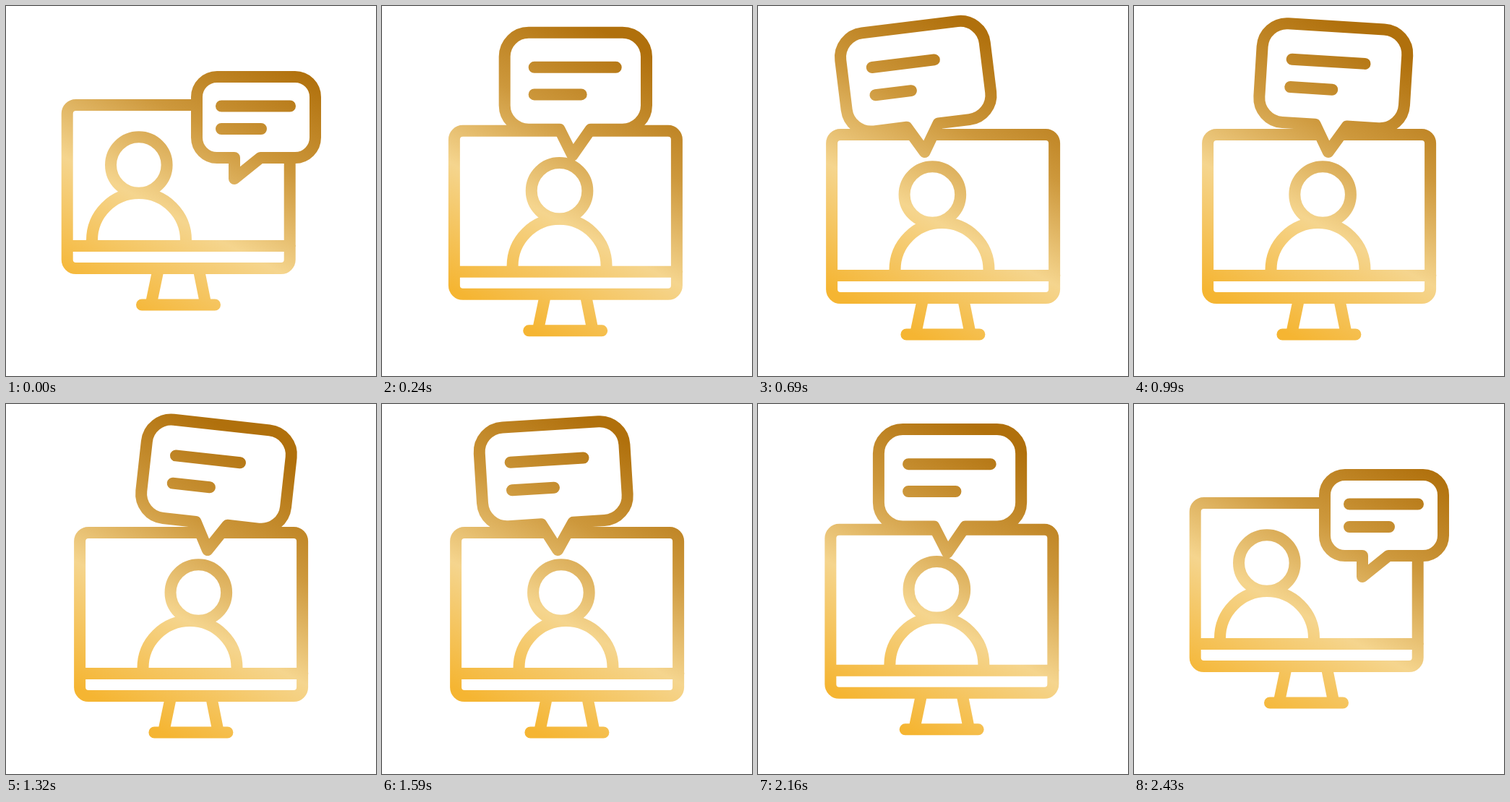
Recreate the animation shown at these times as an HTML page with a canvas. Size 512 by 512 pixels, loop 2.7 s.

```html
<!DOCTYPE html>
<html lang="en">
<head>
<meta charset="utf-8">
<title>Video call with speech bubble</title>
<style>
  html, body { margin: 0; width: 100%; height: 100%; overflow: hidden; background: #fff; }
  canvas { display: block; width: 100vmin; height: 100vmin; }
</style>
</head>
<body>
<canvas id="stage" width="512" height="512"></canvas>
<script>
const ctx = document.getElementById('stage').getContext('2d');
const LOOP = 2700;

const gold = ctx.createLinearGradient(164, 428, 359, 62);
gold.addColorStop(0, '#f5b532');
gold.addColorStop(0.37, '#f5d58e');
gold.addColorStop(0.68, '#cd983c');
gold.addColorStop(1, '#b0700c');

ctx.lineWidth = 16;
ctx.lineCap = ctx.lineJoin = 'round';

const mix = (a, b, p) => a + (b - a) * p;
const ease = x => x * x * (3 - 2 * x);

// Eased value from [time, value] keys.
function track(keys, t) {
  const i = keys.findIndex(k => k[0] > t);
  if (i < 0) return keys[keys.length - 1][1];
  const [t0, v0] = keys[i - 1], [t1, v1] = keys[i];
  return mix(v0, v1, ease((t - t0) / (t1 - t0)));
}

const openKeys = [[0, 0], [310, 1], [2100, 1], [2410, 0]];
const swayKeys = [[0, 0], [310, 0], [600, -1], [1200, 1], [1800, -1], [2100, 0]];

// Paths are placed by matrix so the gradient stays fixed to the stage.
function place(path, matrix) {
  const placed = new Path2D();
  placed.addPath(path, matrix);
  return placed;
}
const shift = (x, y) => new DOMMatrix().translate(x, y);

const monitor = new Path2D(`M119 324`);
monitor.roundRect(84.7, 137, 308, 226, 12);
monitor.addPath(new Path2D(
  'M85 332H393 M211 363L200.6 413 M266.4 363L276.4 413 M188 413.5H289'));
const body = new Path2D('M119 326V324A65 65 0 0 1 249 324V326');
const head = new Path2D();
head.arc(183.8, 220, 38.8, 0, 2 * Math.PI);

function bubblePath(p) {
  const left = mix(264, 156, p), right = mix(428, 357, p);
  const top = mix(98, 28, p), bottom = mix(210, 165, p);
  const r = mix(28, 34, p);
  const path = new Path2D();
  path.moveTo(mix(316, 235.5, p), bottom);
  path.lineTo(mix(316, 256, p), mix(239, 202, p));
  path.lineTo(mix(352, 279.6, p), bottom);
  path.arcTo(right, bottom, right, top, r);
  path.arcTo(right, top, left, top, r);
  path.arcTo(left, top, left, bottom, r);
  path.arcTo(left, bottom, right, bottom, r);
  path.closePath();
  return path;
}

function textPath(p, sway) {
  const x = mix(298, 198, p), scale = 1 - 0.286 * Math.abs(sway);
  const y1 = mix(138.5, 77, p), y2 = mix(170, 115.5, p);
  const w1 = mix(95, 115.7, p) * scale, w2 = mix(55, 66.5, p) * scale;
  return new Path2D(`M${x} ${y1}h${w1}M${x} ${y2}h${w2}`);
}

function draw(t) {
  const p = track(openKeys, t), sway = track(swayKeys, t);
  ctx.fillStyle = '#fff';
  ctx.fillRect(0, 0, 512, 512);
  ctx.strokeStyle = gold;

  ctx.stroke(place(monitor, shift(17.4 * p, 41 * p)));
  ctx.stroke(place(body, shift(70.5 * p, 41 * p)));
  ctx.stroke(place(head, shift(70.7 * p + 15 * sway, 41 * p)));

  // The bubble tilts around the tip of its tail.
  const tilt = shift(256 + 29 * sway, 202).rotate(8 * sway).translate(-256, -202);
  const bubble = place(bubblePath(p), tilt);
  ctx.fill(bubble);
  ctx.stroke(bubble);
  ctx.stroke(place(textPath(p, sway), tilt));
}

function tick() {
  draw(performance.now() % LOOP);
  requestAnimationFrame(tick);
}
tick();
</script>
</body>
</html>
```
